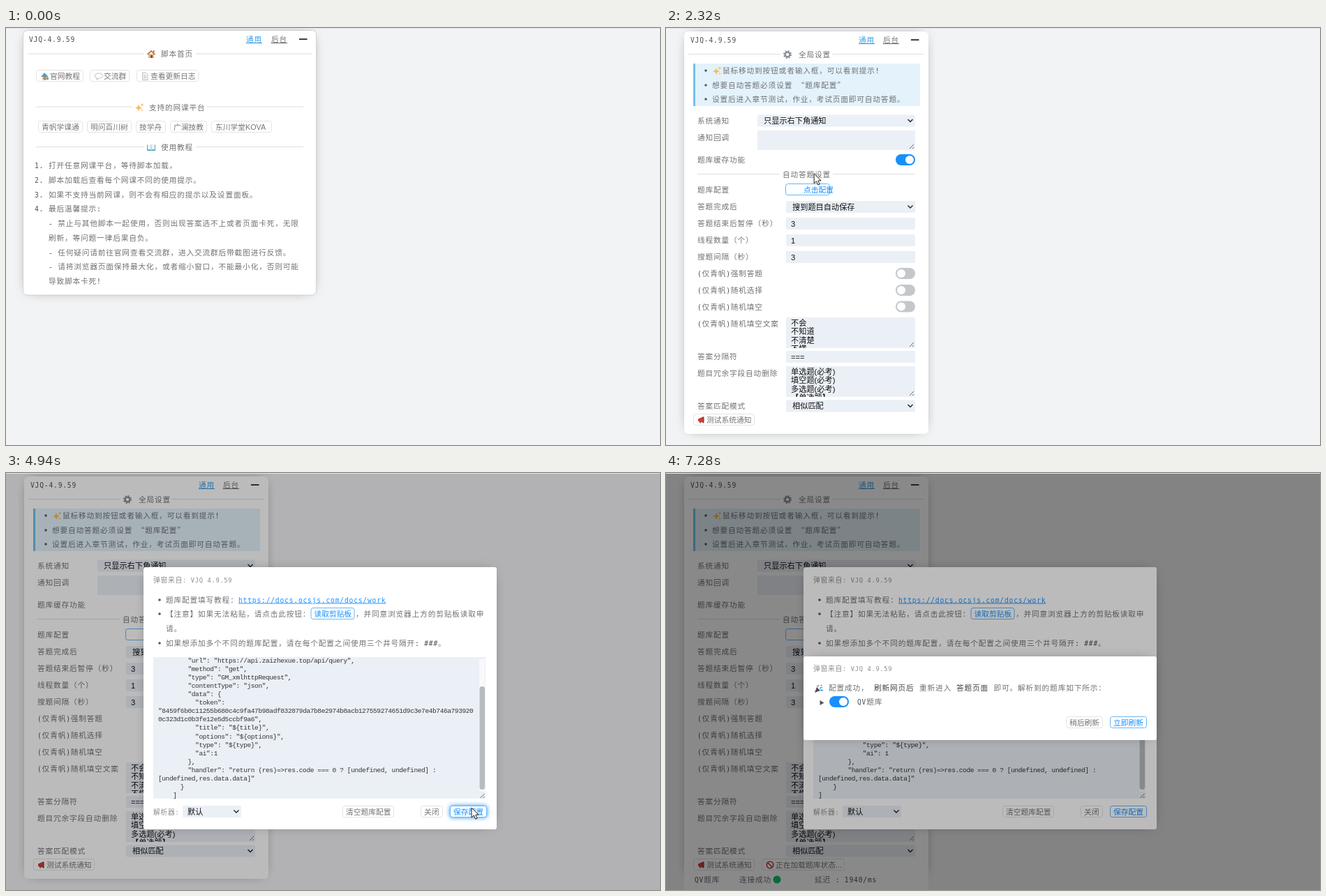
Write an HTML page that moves like this. It is 937 px wide and 598 px high and loops after 7.55 s.

```html
<!DOCTYPE html>
<html lang="zh-CN">
<head>
<meta charset="utf-8">
<title>Script panel demo</title>
<style>
html,body{margin:0;width:100%;height:100%;overflow:hidden;background:#f2f3f5}
svg{display:block}
text{font:300 10.7px "Noto Sans CJK SC","Noto Sans CJK",sans-serif;letter-spacing:.83px;fill:#707276;white-space:pre}
.l{font-family:"DejaVu Sans Mono",monospace;font-size:9.6px;font-weight:400;fill:#4d4f52}
.s .l,.b .l,.f .l,.c .l,.blue .l{fill:inherit}
.s{font-size:9.8px;letter-spacing:.7px;fill:#8e8e8e}
.s .l{font-size:8.7px}
.ph{fill:#b4b4b4}
.u{text-decoration:underline;text-decoration-thickness:1px;text-underline-offset:2px}
.blue{fill:#1890ff}
.nav{fill:#3ba0e6}
.bold{font-weight:500;fill:#444}
.b,.f{font:400 10.75px "Liberation Sans","Noto Sans CJK SC","Noto Sans CJK",sans-serif;letter-spacing:0}
.b{fill:#757575}
.b.blue{fill:#1890ff}
.f{font-size:11.2px;fill:#111}
.b .l,.f .l{font:inherit}
.h{font-size:14.5px;letter-spacing:0;font-weight:400;fill:#444}
.c,.c .l{font:400 9.5px "Liberation Mono",monospace;letter-spacing:-.39px}
.c{fill:#333}
.shade{filter:blur(9.8px)}
.glow{filter:drop-shadow(0 0 3px #1890ff)}
</style>
</head>
<body>
<svg id="stage" width="937" height="598" viewBox="0 0 937 598"></svg>
<script>
const APP = 'VJQ', BANK = 'QV题库', LOOP = 7550;
const INPUT = '#ebf0f6', LINE = '#dcdee0';

const rect = (x, y, w, h, fill, more = '') =>
  `<rect x="${x}" y="${y}" width="${w}" height="${h}" fill="${fill}" ${more}/>`;
const path = (d, fill, more = '') => `<path d="${d}" fill="${fill}" ${more}/>`;
const dot = (x, y, r, fill) => `<circle cx="${x}" cy="${y}" r="${r}" fill="${fill}"/>`;
const stroke = (color, w = 1) => `stroke="${color}" stroke-width="${w}"`;
// y is the middle of the line
const text = (x, y, s, cls = '') =>
  `<text x="${x}" y="${y + 4}" class="${cls}">${s.replace(/[ -~]+/g, m => `<tspan class="l">${m}</tspan>`)}</text>`;
const group = (id, inner, more = '') => `<g id="${id}" ${more}>${inner}</g>`;
// a soft shadow from a smaller box behind the card
const card = (x, y, w, h, r, more = '') =>
  rect(x + 10, y + 10, w - 20, h - 20, '#3e3e3e', 'class="shade"') + rect(x, y, w, h, '#fff', `rx="${r}" ${more}`);
const button = (x, y, w, s, blue = false, pad = 5, glow = false) =>
  rect(x + .5, y + .5, w - 1, 16, '#fff', `rx="3" ${stroke(blue ? '#69b5f8' : '#e4e4e4')} ${glow ? 'class="glow"' : ''}`) +
  text(x + pad, y + 8.5, s, blue ? 'b blue' : 'b');
const rule = (y, ...xs) => {
  let out = '';
  for (let i = 0; i < xs.length; i += 2) out += rect(xs[i], y, xs[i + 1] - xs[i], 1, LINE);
  return out;
};
const chevron = (x, y) => path(`M${x - 3.5} ${y - 2}l3.5 3.5 3.5-3.5`, 'none', stroke('#222', 1.4));
const grip = (x, y) => path(`M${x - 6} ${y}l6-6M${x - 2} ${y}l2-2`, 'none', stroke('#666'));
const field = (x, y, w, h, s) => rect(x, y, w, h, INPUT, 'rx="2"') + text(x + 7, y + h / 2, s, 'f');
const select = (x, y, w, s, pad = 9) =>
  rect(x, y, w, 17, INPUT, 'rx="2"') + text(x + pad, y + 8.5, s, 'f') + chevron(x + w - 7, y + 8.5);
const toggle = (x, y, on) =>
  rect(x, y, 28, 16, on ? '#1890ff' : '#c4c7cb', 'rx="8"') + dot(on ? x + 20 : x + 8, y + 8, 6, '#fff');

// small pictures in a 12 x 12 box
const pics = {
  home: rect(2, 6, 8, 6, '#e3b778') + path('M0 6.5 6 1l6 5.5-1 1-5-4.5-5 4.5z', '#a85c38') + rect(5, 8, 3, 4, '#6d5a54') + rect(9, 1, 1.5, 3, '#c0622f'),
  school: rect(2, 6, 8, 5.5, '#e8c590') + path('M0 7 5 1l6 6z', '#5a9db8') + rect(4, 7, 3, 4.5, '#d8705e') + dot(9.5, 9.5, 1.8, '#6aab6b'),
  chat: path('M6 2c8 0 7 7 0 7L3 11.5 3.5 8.6C-1.5 7-.5 2 6 2z', '#fff', stroke('#b4b4b4', .9)),
  page: path('M2.5 1h5l2.5 2.5V11.5H2.5z', '#f7f7f7', stroke('#b0b0b0', .8)) + path('M4 5h4M4 7h4M4 9h4', 'none', stroke('#aaa', .7)),
  star: path('M5 2 6.5 5.5 10 7 6.5 8.5 5 12 3.5 8.5 0 7 3.5 5.5zM10 0l.7 1.8 1.8.7-1.8.7L10 5l-.7-1.8-1.8-.7 1.8-.7zM10 8.5l.5 1.3 1.3.5-1.3.5-.5 1.2-.5-1.2-1.3-.5 1.3-.5z', '#f6bb59'),
  book: path('M0 2.5h12v8.5H0z', '#4fa8cc') + path('M1 2q3-1 5 .5Q8 1 11 2v7.5Q8 8.5 6 10 4 8.5 1 9.5z', '#eef3f6') + path('M6 2.5v7', 'none', stroke('#9ab', .7)),
  gear: `<circle cx="6" cy="6" r="3.4" fill="none" ${stroke('#858c92', 2.4)}/><circle cx="6" cy="6" r="5.2" fill="none" ${stroke('#858c92', 1.6)} stroke-dasharray="2.04"/>`,
  globe: dot(6, 6, 5.7, '#2084b8') + path('M2 2q4-2 5 0L5 5 4 7 1 5zM7 6l4-2v4L8 11z', '#58a83c'),
  lens: path('M5.5 7 1 11', 'none', stroke('#7b4a38', 2.2)) + `<circle cx="7.5" cy="4.5" r="3.7" fill="#7cc9f0" ${stroke('#3576a8', 1.3)}/>`,
  photo: rect(.5, 1.5, 11, 9.5, '#8cc8e6', stroke('#d59a45', 1.3)) + path('M1 10.5 4.5 6 7 8 9 6l2.5 4.5z', '#5a9b55') + dot(8.5, 4, 1.2, '#f3d04c'),
  phone: rect(2.5, .5, 7, 11, '#333a55', 'rx="1"') + rect(3.5, 2, 5, 7.5, '#754a78') + dot(5, 4, .8, '#f09a50') + dot(7, 7, .8, '#65b4e8'),
  horn: path('M1 4.5 8 1.5v8.5L1 8z', '#cf3d32') + rect(8, 1.5, 1.5, 9, '#774032') + path('M3 8h2v2.5H3z', '#666') + dot(10.5, 6, 1, '#ddd'),
  stop: `<circle cx="6" cy="6" r="4.7" fill="none" ${stroke('#c9302c', 1.6)}/>` + path('M2.7 2.7l6.6 6.6', 'none', stroke('#c9302c', 1.6)),
  party: path('M0 12 3 4l5 5z', '#4a4f63') + path('M4 4 6 1M7 6l4-2M8 8l4 1', 'none', stroke('#2d8fe0', 1.3)) + dot(9.5, 1.5, 1, '#e75a4d') + dot(3, 2, .8, '#f1b83c'),
  warn: path('M6 .5 12 11.5H0z', '#f6a623', 'stroke="#f6a623" stroke-linejoin="round"') + path('M6 4v4M6 9v1.3', 'none', stroke('#333', 1.3))
};
const pic = (name, x, y, k = 1) => `<g transform="translate(${x} ${y - 6 * k}) scale(${k})">${pics[name]}</g>`;

function header(x, y, gx, bx, mx) {
  return text(x, y, APP + '-4.9.59') + text(gx, y, '通用', 'nav u') + text(bx, y, '后台', 'u') + rect(mx, y - 1, 11.5, 2, '#443c40');
}

function home() {
  const steps = ['打开任意网课平台，等待脚本加载，', '脚本加载后查看每个网课不同的使用提示。',
    '如果不支持当前网课，则不会有相应的提示以及设置面板。', '最后温馨提示:',
    '- 禁止与其他脚本一起使用，否则出现答案选不上或者页面卡死，无限', '刷新，等问题一律后果自负。',
    '- 任何疑问请前往官网查看交流群，进入交流群后带截图进行反馈。',
    '- 请将浏览器页面保持最大化，或者缩小窗口，不能最小化，否则可能', '导致脚本卡死!'];
  return card(24.5, 3.5, 420, 379.5, 6, stroke('#d2d2d2')) +
    rect(338, 7, 35, 18, '#f0f1f3', 'id="tab"') + header(33, 16, 344, 380, 420) +
    rule(36.5, 31, 198, 272, 439) + pic('home', 202, 37) + text(222, 37, '脚本首页') +
    button(43, 60, 68, '官网教程', false, 20) + pic('school', 50, 69) +
    button(120, 60, 57, '交流群', false, 20) + pic('chat', 127, 69) +
    button(187, 60, 89, '查看更新日志', false, 20) + pic('page', 193, 69) +
    rule(112.5, 43, 181, 288, 426) + pic('star', 185, 113.5) + text(205, 113.5, '支持的网课平台') +
    button(46, 133, 64, '青帆学课通') + button(116, 133, 64, '明问百川树') + button(186, 133, 43, '技学舟') +
    button(235, 133, 53, '广澜技教') + button(294, 133, 87, '东川学堂KOVA', false, 6) +
    rule(170, 43, 198, 272, 426) + pic('book', 202, 171) + text(222, 171, '使用教程') +
    steps.map((s, i) => (i < 4 ? text(41, 197 + i * 20.75, i + 1 + '.') : '') + text(61, 197 + i * 20.75, s)).join('');
}

function menu() {
  const items = ['home:脚本首页', 'gear:全局设置', 'globe:搜索结果', 'lens:在线搜题', 'photo:窗口设置', 'phone:拓展应用'];
  return card(338, 26, 115, 133, 4) + rect(345, 35, 98, 19, '#f1f3f4', 'id="hover"') +
    items.map((item, i) => {
      const [icon, label] = item.split(':'), y = 44.5 + i * 19.15;
      return pic(icon, 349, y) + text(370, y, label, 'item');
    }).join('');
}

function settings() {
  const labels = [[132.5, '系统通知'], [156.5, '通知回调'], [189, '题库缓存功能'], [232, '题库配置'], [256, '答题完成后'],
    [280, '答题结束后暂停（秒）'], [304, '线程数量（个）'], [328, '搜题间隔（秒）'], [352, '(仅青帆)强制答题'],
    [376, '(仅青帆)随机选择'], [399.5, '(仅青帆)随机填空'], [423.5, '(仅青帆)随机填空文案'],
    [470.5, '答案分隔符'], [494.5, '题目冗余字段自动删除'], [541.5, '答案匹配模式']];
  const area = (id, y, lines) => rect(172, y, 185, 44, INPUT) +
    `<clipPath id="${id}"><rect x="172" y="${y}" width="185" height="44"/></clipPath><g clip-path="url(#${id})">` +
    lines.map((s, i) => text(179, y + 8 + i * 12.3, s, 'f')).join('') + '</g>' + grip(355, y + 42);
  return card(26, 5, 350, 577, 6) + header(35, 17, 276, 311, 351) +
    rule(37, 32, 164, 238, 369) + pic('gear', 168, 38) + text(190, 37.5, '全局设置') +
    rect(39, 51, 325, 61, '#e3f2fb') + rect(39, 51, 3, 61, '#74c0ee') +
    [61, 82, 102].map(y => dot(57, y, 1.7, '#555')).join('') +
    pic('star', 67, 61) + text(81, 61, '鼠标移动到按钮或者输入框，可以看到提示!') +
    text(66, 82, '想要自动答题必须设置 “题库配置”') + text(66, 102, '设置后进入章节测试，作业，考试页面即可自动答题。') +
    labels.map(([y, s]) => text(45, y, s)).join('') +
    select(131, 124.5, 226, '只显示右下角通知') + rect(131, 147, 226, 28, INPUT) + grip(355, 173) +
    rule(209, 45, 163, 239, 357) + text(167, 209.5, '自动答题设置') +
    button(171, 223, 64, '点击配置', true, 26) + select(172, 248, 185, '搜到题目自动保存') +
    field(172, 272, 185, 17, '3') + field(172, 296, 185, 17, '1') + field(172, 320, 185, 17, '3') +
    [189, 352, 376, 399.5].map(y => toggle(329, y - 8, y < 200)).join('') +
    area('fillBox', 415, ['不会', '不知道', '不清楚', '不懂']) + field(172, 463, 185, 17, '===') +
    area('trimBox', 485, ['单选题(必考)', '填空题(必考)', '多选题(必考)', '【单选题】']) +
    select(172, 533.5, 185, '相似匹配') +
    button(39, 553, 88, '测试系统通知', false, 19) + pic('horn', 45, 562) +
    group('loading', button(137, 553, 119, '正在加载题库状态...', false, 20) + pic('stop', 143, 562)) +
    group('status', rect(26, 574, 350, 24, '#fff') + text(41, 583, BANK) + text(105, 583, '连接成功') +
      dot(159, 583, 5.5, '#10c469') + text(213, 583, '延迟 : 1940/ms'));
}

const from = y => text(211, y, `弹窗来自: ${APP} 4.9.59`, 's');

function token(n) {
  let seed = 4159, out = '';
  while (n--) {
    seed = (seed * 1103515 + 12345) % 2147483647;
    out += (seed >> 9 & 15).toString(16);
  }
  return out;
}

function code(cols, gap) {
  const key = token(110);
  const lines = [[0, '"url": "https://api.zaizhexue.top/api/query",'], [0, '"method": "get",'], [0, '"type": "GM_xmlhttpRequest",'],
    [0, '"contentType": "json",'], [0, '"data": {'], [1, '"token":'], [4, '"' + key.slice(0, 84)], [4, key.slice(84) + '",'],
    [1, '"title": "${title}",'], [1, '"options": "${options}",'], [1, '"type": "${type}",'], [1, `"ai":${gap}1`], [0, '},'],
    [0, '"handler": "return (res)=>res.code === 0 ? [undefined, undefined] :'], [4, '[undefined,res.data.data]"'], [2, '}'], [3, ']']];
  return lines.map(([k, s], i) => text(218 + cols[k] * 5.31, 267.5 + i * 12.12, s, 'c')).join('');
}

function config() {
  return card(197, 135, 506, 376, 3) + from(153) +
    [182, 202, 244].map(y => dot(220, y, 1.8, '#555')).join('') +
    text(229, 181.5, '题库配置填写教程：') + text(333, 181.5, 'https://docs.ocsjs.com/docs/work', 'blue u') +
    text(229, 202, '【注意】如果无法粘贴，请点击此按钮：') + button(436.5, 193, 63, '读取剪贴板', true) +
    text(501, 202, '，并同意浏览器上方的剪贴板读取申') + text(229, 222.5, '请。') +
    text(229, 243.5, '如果想添加多个不同的题库配置，请在每个配置之间使用三个井号隔开: ###。') +
    rect(211, 264, 476, 203, INPUT, 'id="box"') + group('hint', text(218, 272, '输入你的题库配置...', 's ph')) +
    rect(218, 267, 1, 11, '#222', 'id="caret"') +
    '<clipPath id="boxClip"><rect x="211" y="264" width="476" height="203"/></clipPath>' +
    group('filled', rect(678, 267, 8, 190, '#f7f9fb') + rect(678.5, 306, 7.5, 148, '#b9bbbd', 'rx="3.5"') +
      group('raw', code([8, 10, 6, 4, 0], '')) + group('tidy', code([8, 12, 4, 0, 0], ' ')), 'clip-path="url(#boxClip)"') +
    grip(685.5, 466) + text(211, 486, '解析器:', 's') + select(253, 477, 84, '默认', 7) +
    button(482, 477, 74, '清空题库配置') + button(594, 477, 32, '关闭') +
    button(636, 477, 53, '保存配置', true) + group('saveGlow', button(636, 477, 53, '保存配置', true, 5, true));
}

function success() {
  return card(197, 263, 506, 120, 3) + from(280) + pic('party', 213, 309) + text(233, 308, '配置成功，') +
    text(298, 308, '刷新网页后', 'bold') + text(363, 308, '重新进入') + text(416, 308, '答题页面', 'bold') +
    text(469.5, 308, '即可。解析到的题库如下所示：') +
    path('M220.5 326l6 3.5-6 3.5z', '#555') + toggle(234, 320, true) + text(274, 327.5, BANK) +
    button(573, 349, 53, '稍后刷新') + button(636, 349, 53, '立即刷新', true);
}

function warning() {
  return card(197, 244, 506, 158, 3) + from(262) + pic('warn', 214, 284, 1.15) + text(232, 284, '警告', 'h') +
    text(211, 312, '配置成功，但检测到以下 域名/ip 不在脚本的白名单中，请安装 :') +
    text(563, 312, APP + '全域名通用版本', 'blue u') + text(664.5, 312, '，或') +
    text(211, 331.5, '者手动添加 @connect ，否则无法进行请求。') + dot(220, 351, 1.8, '#555') +
    text(229, 351, 'api.zaizhexue.top') + button(657, 371, 32, '确定', true, 5, true);
}

const edge = 'stroke="#222" stroke-width="1" stroke-linejoin="round"';
const cursor = group('press', dot(3, 1, 9, '#eeee2a'), 'opacity=".75"') +
  group('arrow', path('M0 0v14l3.3-3 2.4 5.3 2.3-1L5.7 10.2H10z', '#fff', edge)) +
  group('hand', path('M-1.3 1q1.3-2 2.6 0V6q1.5-1.2 2.5.2 1.7-.8 2.3.6 1.9-.4 2 1.2V11.5L6.6 16H0l-4-6q.2-2.3 2.7-.6z', '#fff', edge)) +
  group('beam', path('M-3.5-6.5h2.5q1 0 1 1 0-1 1-1h2.5M0-5.5v11M-3.5 6.5h2.5q1 0 1-1 0 1 1 1h2.5', 'none', stroke('#222', 1.3)));

const dim = id => rect(0, 1, 937, 597, '#000', `id="${id}" opacity=".265"`);
document.getElementById('stage').innerHTML = rect(0, 0, 937, 598, '#f2f3f5') +
  group('home', home()) + group('menu', menu()) + group('settings', settings()) +
  dim('dim1') + group('config', config()) + dim('dim2') + group('success', success()) +
  dim('dim3') + group('warning', warning()) + rect(0, 0, 937, 1, '#e2e4e9') + group('cursor', cursor);

const $ = id => document.getElementById(id);
const show = (id, on) => { $(id).style.display = on ? '' : 'none'; };
const items = document.querySelectorAll('.item');

// time, x, y of the pointer tip
const track = [[70, 905, 592], [270, 800, 420], [450, 520, 170], [600, 302, 70], [700, 304, 46], [800, 338, 30],
  [1000, 348, 14], [1400, 350, 19], [1600, 358, 49], [1720, 361, 53], [1860, 372, 62], [1990, 372, 62],
  [2130, 300, 140], [2380, 185, 230], [2580, 185, 230], [2710, 311, 240], [3130, 420, 304], [3260, 426, 306],
  [3610, 426, 306], [3800, 422, 304], [4070, 422, 304], [4600, 667, 480], [5150, 667, 480], [5480, 616, 364],
  [5620, 616, 364], [6010, 660, 379], [6480, 660, 379], [6750, 760, 470], [7090, 903, 555], [7280, 908, 600]];

function pointer(t) {
  const i = track.findIndex(k => k[0] > t);
  if (i < 1) return track[i < 0 ? track.length - 1 : 0].slice(1);
  const [t0, x0, y0] = track[i - 1], [t1, x1, y1] = track[i], k = (t - t0) / (t1 - t0);
  return [x0 + (x1 - x0) * k, y0 + (y1 - y0) * k];
}

function draw(t) {
  const within = (a, b) => t >= a && t < b;
  const [x, y] = pointer(t);

  show('home', t < 2000);
  show('tab', within(870, 2000));
  show('menu', within(1000, 2000));
  const row = within(1500, 1860) ? 0 : t >= 1860 ? 1 : -1;
  show('hover', row >= 0);
  $('hover').setAttribute('y', 35 + Math.max(row, 0) * 19.15);
  items.forEach((el, i) => { el.style.fill = i === row ? '#3ba0e6' : ''; });

  show('settings', t >= 2000);
  show('loading', t >= 5010);
  show('status', t >= 6700);

  ['dim1', 'config'].forEach(id => show(id, t >= 2580));
  ['dim2', 'success'].forEach(id => show(id, t >= 5010));
  ['dim3', 'warning'].forEach(id => show(id, within(5010, 6480)));

  const focus = within(3190, 4800), pasted = t >= 4070;
  $('box').setAttribute('fill', focus ? '#fff' : INPUT);
  $('box').setAttribute('stroke', focus ? '#7fc1f5' : 'none');
  show('hint', !pasted);
  show('caret', within(3610, 3940));
  show('filled', pasted);
  show('raw', t < 5010);
  show('tidy', t >= 5010);
  show('saveGlow', within(4800, 5010));

  const hand = within(830, 2030) || within(2330, 2580) || within(5960, 6520);
  const beam = within(2580, 4500);
  show('cursor', within(70, 7280));
  $('cursor').setAttribute('transform', `translate(${x.toFixed(2)} ${y.toFixed(2)})`);
  show('hand', hand);
  show('beam', beam);
  show('arrow', !hand && !beam);
  show('press', within(1860, 1990) || within(2380, 2580) || within(3190, 3260) || within(4800, 4940) || within(6340, 6480));
}

function tick(now) {
  draw(now % LOOP);
  requestAnimationFrame(tick);
}
draw(0);
requestAnimationFrame(tick);
</script>
</body>
</html>
```
